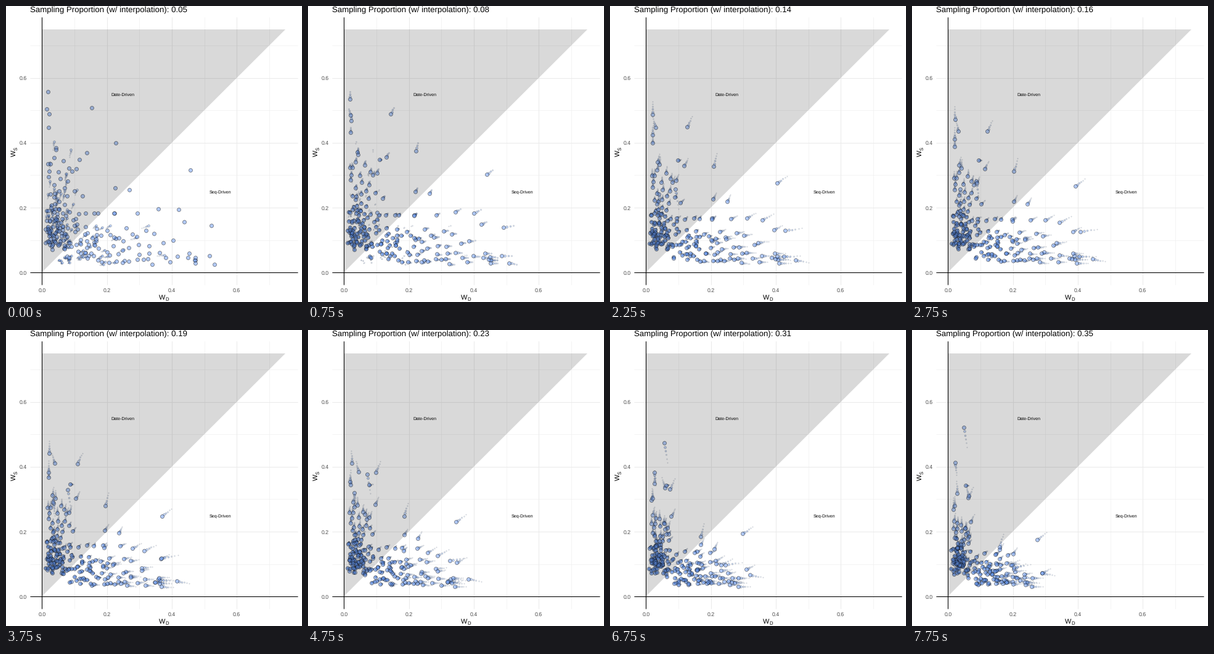
A matplotlib script that plays this animation: 480 by 480 pixels, repeating every 8 s.

```python
import numpy as np
import matplotlib.pyplot as plt
from matplotlib.animation import FuncAnimation

FRAMES, STEP, LAGS = 32, 250, 5
FILL = (100 / 255, 149 / 255, 237 / 255)
X0, Y0, UNIT = 58.3, 432.4, 526.4  # plot origin and pixels per data unit

plt.rcParams["font.family"] = "Liberation Sans"
plt.rcParams["text.hinting"] = "none"
rng = np.random.default_rng(8)

# Outlying points, in pixels: start x, y, end x, y
KEY = np.array([
    (178, 222, 142, 352), (139, 165, 91, 272), (68, 139, 73, 265),
    (70, 175, 67, 291), (66, 167, 92, 269), (119, 249, 87, 252),
    (115, 354, 84, 158), (83, 342, 70, 215), (299, 266, 203, 340),
    (177, 295, 142, 356), (200, 298, 164, 363), (247, 329, 160, 381),
    (280, 330, 165, 388), (289, 350, 211, 394), (333, 356, 165, 385),
    (330, 405, 163, 408), (338, 419, 211, 394),
], float)


def px(v):
    return X0 + UNIT * v


def py(v):
    return Y0 - UNIT * v


def to_pixels(p):
    return np.column_stack([X0 + p[:, 0], Y0 - p[:, 1]])


def tall_cloud(n):
    """Points beside the vertical axis, as offsets from the origin."""
    return np.column_stack([4 + rng.gamma(2.2, 10.5, n),
                            37 + rng.gamma(1.5, 33, n)])


def wide_cloud(n):
    """Points above the horizontal axis, as offsets from the origin."""
    return np.column_stack([24 + rng.gamma(1.7, 52, n).clip(0, 225),
                            11 + rng.gamma(2.2, 16, n).clip(0, 85)])


def shrink(p, base, scale, spread):
    """Pull a cloud towards the origin with some scatter."""
    return np.array(base) + p * scale + rng.normal(0, spread, p.shape)


def make_paths():
    tall, wide = tall_cloud(112), wide_cloud(82)
    tall_end = shrink(tall, (7, 25), (.47, .49), (3, 5))
    wide_end = shrink(wide, (25, 11), (.42, .6), (7, 4))
    start = np.vstack([KEY[:, :2], to_pixels(tall), to_pixels(wide)])
    end = np.vstack([KEY[:, 2:], to_pixels(tall_end.clip(5)),
                     to_pixels(wide_end.clip(9))])
    return start, end


START, END = make_paths()
# what the end of the longer cycle leaves behind: points drifting outwards
LATE = np.vstack([tall_cloud(60) * (1, 1.25), wide_cloud(45) * (.8, .8)])


def place(k):
    if k < 0:
        return to_pixels(LATE * (1 + .015 * (k + 1)))
    return START + (END - START) * k / (FRAMES - 1)


fig = plt.figure(figsize=(480 / 72, 480 / 72), dpi=72, facecolor="white")
ax = fig.add_axes([0, 0, 1, 1])
ax.set(xlim=(0, 480), ylim=(480, 0))
ax.axis("off")


def rule(v, color, width, vertical):
    xs, ys = ([px(v)] * 2, [18, 452]) if vertical else ([38.5, 473], [py(v)] * 2)
    ax.plot(xs, ys, color=color, lw=width, solid_capstyle="butt", zorder=1)


def label(x, y, s, size, color="black", **kw):
    return ax.text(x, y, s, fontsize=size, color=color, va="baseline", zorder=8, **kw)


for vertical in (False, True):
    for i in range(8):
        rule(i / 10, "#ebebeb", .53 if i % 2 else 1.07, vertical)
for vertical in (False, True):
    rule(0, "black", 1.07, vertical)

for i in range(4):
    v = i * .2
    label(px(v), 464, f"{v:.1f}", 8.8, "#4d4d4d", ha="center")
    label(34, py(v) + 3.4, f"{v:.1f}", 8.8, "#4d4d4d", ha="right")

turned = dict(rotation=90, rotation_mode="anchor")
label(247.6, 476, "W", 11)
label(258, 478.2, "D", 7.7)
label(16, 244, "W", 11, **turned)
label(18.2, 233.6, "S", 7.7, **turned)
label(px(.25), py(.55) + 2.6, "Date-Driven", 7.11, ha="center")
label(px(.55), py(.25) + 2.6, "Seq-Driven", 7.11, ha="center")
title = label(39, 10, "", 13.2)


def dots(radius, fill_alpha, edge_alpha, width, z):
    return ax.scatter([], [], s=(2 * radius) ** 2, facecolors=[(*FILL, fill_alpha)],
                      edgecolors=[(0, 0, 0, edge_alpha)], linewidths=width, zorder=z)


def wake_dots(lag):
    left = (1 - lag / (LAGS + 1)) ** 2
    return dots(.6 + 1.9 * left, .15 + .35 * left, .2 + .25 * left, .5, 4 - lag / 10)


wakes = [wake_dots(lag) for lag in range(1, LAGS + 1)]
heads = dots(3.0, .5, .52, .75, 5)

# the shaded half lies over the points
ax.fill([px(0), px(0), px(.75)], [py(0), py(.75), py(.75)], color="black",
        alpha=.15, lw=0, zorder=6)


def draw(k):
    title.set_text(f"Sampling Proportion (w/ interpolation): {.05 + .0096 * k:.2f}")
    heads.set_offsets(place(k))
    for lag, wake in enumerate(wakes, 1):
        wake.set_offsets(place(k - lag))
    return [title, heads, *wakes]


anim = FuncAnimation(fig, draw, frames=FRAMES, interval=STEP, repeat=True,
                     repeat_delay=0, init_func=lambda: draw(0))
plt.show()
```
